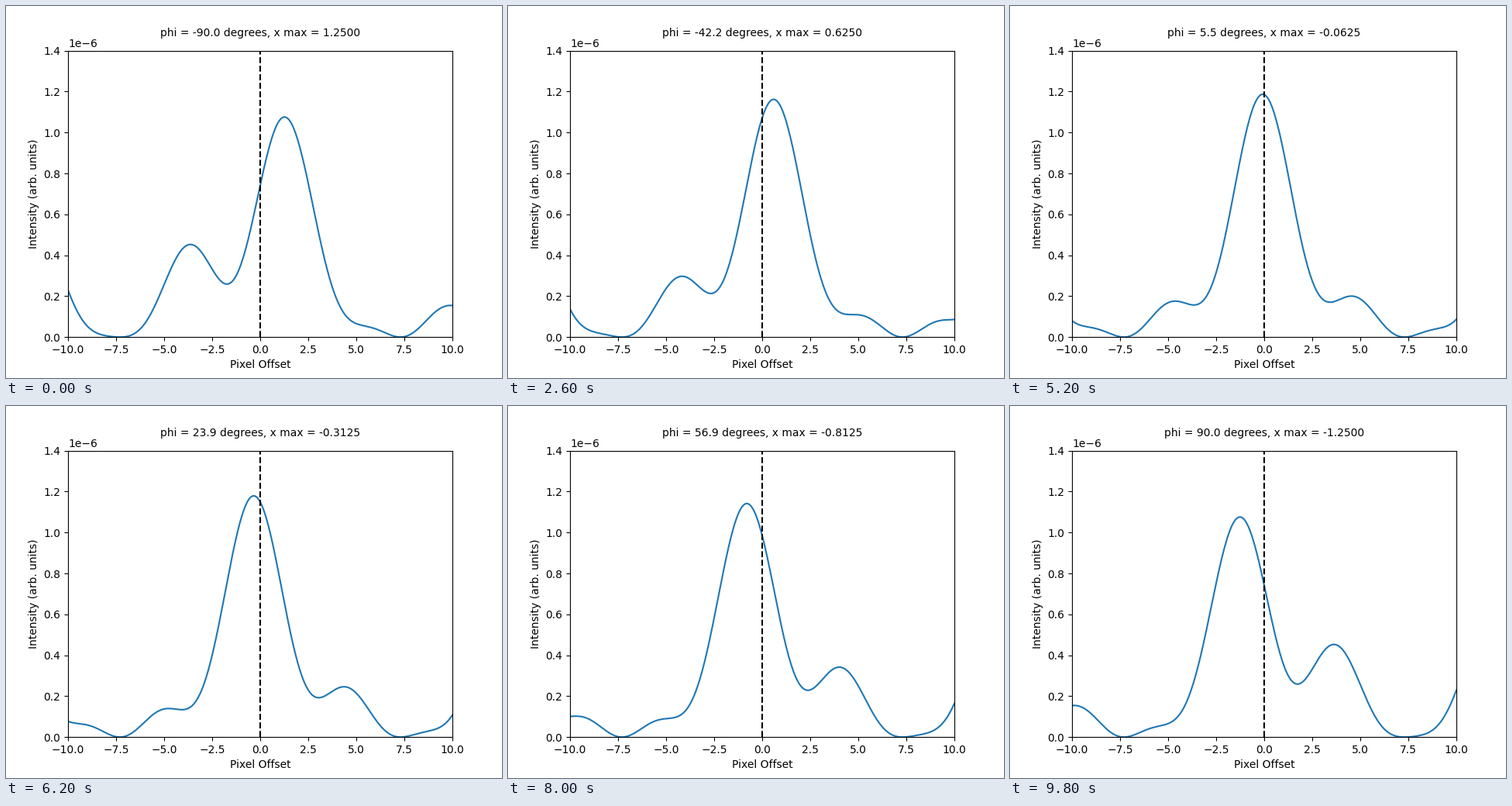
Animation of 640x480 px, one loop 10000 ms. Source, as a matplotlib script:

```python
import numpy as np
import matplotlib.pyplot as plt
from matplotlib.animation import FuncAnimation

FRAMES = 50
INTERVAL = 200      # ms
PEAK = 0.742e-6     # mean intensity at the centre
CONTRAST = 0.6
FRINGE = 0.976      # fringe phase per pixel, rad
NULL = 7.3          # first zero of the envelope
WIDTH = 25.7        # slow Gaussian falloff

phases = np.linspace(-90, 90, FRAMES)
x = np.arange(-10, 10 + 1 / 32, 1 / 16)
envelope = PEAK * np.cos(np.pi * x / (2 * NULL)) ** 2 * np.exp(-(x / WIDTH) ** 2)


def intensity(phi):
    return envelope * (1 + CONTRAST * np.cos(FRINGE * x + np.radians(phi)))


fig, ax = plt.subplots(figsize=(6.4, 4.8), dpi=100)
line, = ax.plot(x, intensity(phases[0]))
ax.axvline(0, color="k", linestyle="--")
ax.set_xlim(-10, 10)
ax.set_ylim(0, 1.4e-6)
ax.set_xlabel("Pixel Offset")
ax.set_ylabel("Intensity (arb. units)")
label = ax.text(0.5, 1.05, "", transform=ax.transAxes, ha="center")


def update(i):
    phi = phases[i]
    y = intensity(phi)
    line.set_ydata(y)
    label.set_text(f"phi = {phi:.1f} degrees, x max = {x[np.argmax(y)]:.4f}")
    return line, label


anim = FuncAnimation(fig, update, frames=FRAMES, interval=INTERVAL,
                     repeat=True, repeat_delay=0)
plt.show()
```
